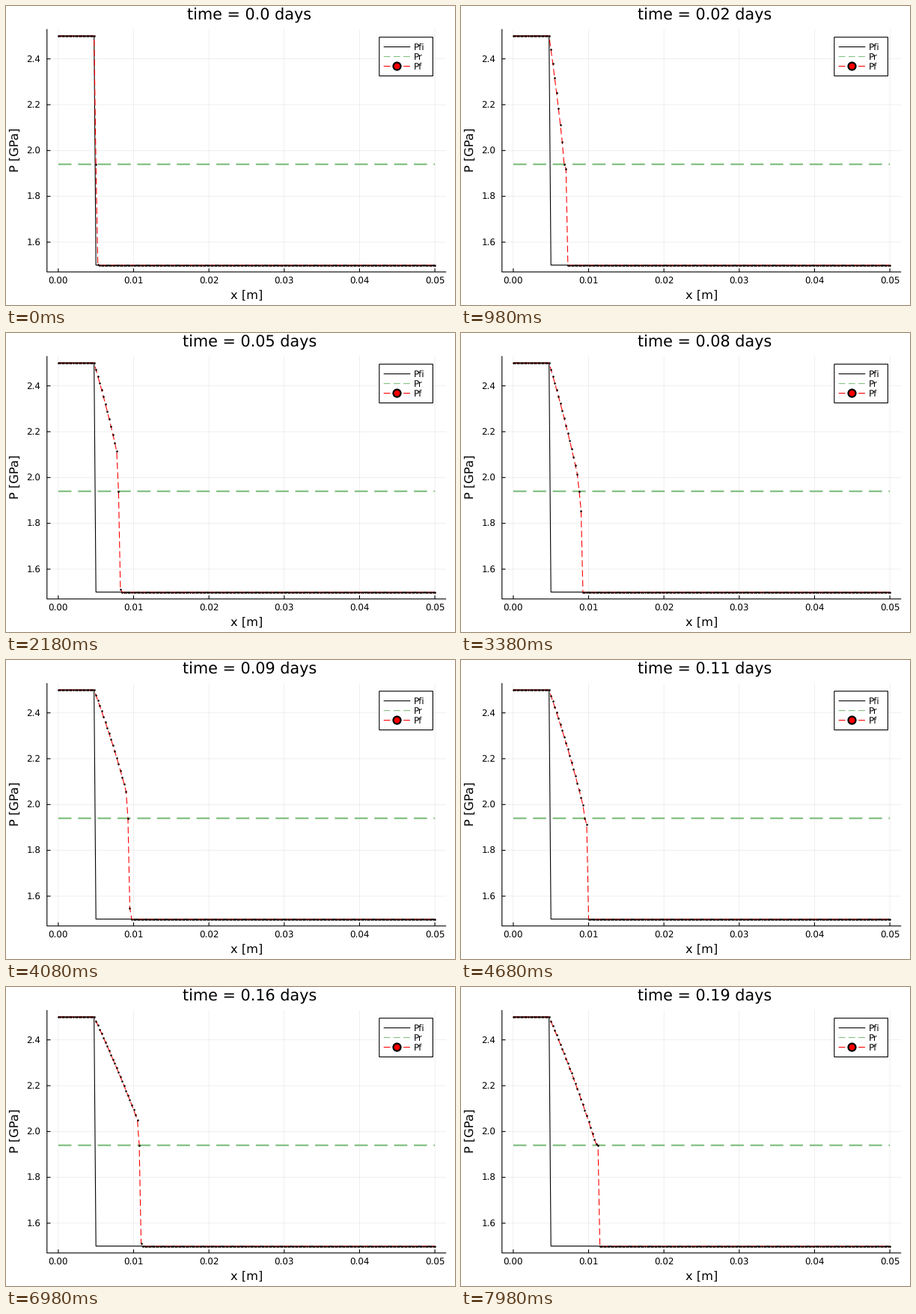
Recreate the animation shown at these times as a matplotlib script. Size 600 by 400 pixels, loop 8000 ms.

```python
import numpy as np
import matplotlib.pyplot as plt
from matplotlib.animation import FuncAnimation
from matplotlib.patches import Circle, Rectangle

plt.rcParams["font.family"] = "DejaVu Sans"
plt.rcParams["text.hinting"] = "none"

WIDTH, HEIGHT, DPI = 600, 400, 100
FRAME_MS, LOOP_MS = 20, 8000
PT = 72 / DPI  # points per pixel

LEFT, RIGHT, TOP, BOTTOM = 54.76, 588.19, 30.87, 355.8
P_HIGH, P_LOW, P_REACT = 2.5, 1.5, 1.94
SOURCE_CELL, LAST_CELL = 19, 44   # high-pressure edge, last cell to react
LATENT = 13                       # storage of the reaction, in GPa
PERM_SLOPE = 0.6                  # growth of permeability with pressure
LAST_STEP = 80
STEP_DAYS = 200 / 86400

x_cells = np.linspace(0, 0.05, 201)
initial = np.where(np.arange(201) <= SOURCE_CELL, P_HIGH, P_LOW)


def px(x):
    return LEFT + (RIGHT - LEFT) * (0.03 + np.asarray(x) / 0.05) / 1.06


def py(p):
    return BOTTOM - (BOTTOM - TOP) * (0.03 + np.asarray(p) - P_LOW) / 1.06


def simulate(dt=0.3, limit=60000):
    """Pressure diffusion behind a reaction front that opens pores cell by cell."""
    stored = initial[SOURCE_CELL:LAST_CELL + 4].copy()
    stored[0] += LATENT
    last = LAST_CELL - SOURCE_CELL
    history = []
    for _ in range(limit):
        excess = stored - P_REACT
        reacted = np.minimum(np.maximum(excess / LATENT, 0), 1)
        p = stored - reacted * LATENT
        history.append(p)
        if reacted[last] >= 1:
            break
        pores = (reacted[1:] + reacted[:-1]) / 2
        mid = np.maximum((p[1:] + p[:-1]) / 2 - P_REACT, 0)
        flux = pores ** 3 * (1 + PERM_SLOPE * mid) * (p[:-1] - p[1:])
        stored[1:-1] += dt * (flux[:-1] - flux[1:])
    return np.array(history)


history = simulate()


def pressure(step):
    share = (step + 1 if step else 0.3) / (LAST_STEP + 1)
    result = initial.copy()
    result[SOURCE_CELL:LAST_CELL + 4] = history[int(share * (len(history) - 1))]
    return result


fig = plt.figure(figsize=(WIDTH / DPI, HEIGHT / DPI), dpi=DPI, facecolor="white")
ax = fig.add_axes([0, 0, 1, 1])
ax.set_xlim(0, WIDTH)
ax.set_ylim(HEIGHT, 0)
ax.axis("off")


def line(xs, ys, color="black", width=1.1, dashed=False, **style):
    if dashed:
        # Dash lengths scale with the line width.
        style["linestyle"] = (0, (8, 4))
        style["dash_capstyle"] = "butt"
    artist, = ax.plot(xs, ys, color=color, lw=width * PT, snap=False,
                      solid_capstyle="butt", **style)
    return artist


def label(x, y, text, size, ha="center", **style):
    return ax.text(x, y, text, fontsize=size * PT, ha=ha, va="baseline", **style)


TICK_SIZE, GUIDE_SIZE, TITLE_SIZE = 11.9, 16.3, 20.8
TICK_LENGTH = 4.72

for value in np.arange(6) / 100:
    x = float(px(value))
    line([x, x], [TOP, BOTTOM], width=0.6, alpha=0.1)
    line([x, x], [BOTTOM, BOTTOM - TICK_LENGTH])
    label(x, 371.4, f"{value:.2f}", TICK_SIZE)
for value in (1.6, 1.8, 2.0, 2.2, 2.4):
    y = float(py(value))
    line([LEFT, RIGHT], [y, y], width=0.6, alpha=0.1)
    line([LEFT, LEFT + TICK_LENGTH], [y, y])
    label(46.3, y + 4.4, f"{value:.1f}", TICK_SIZE, ha="right")
line([LEFT, LEFT, RIGHT], [TOP, BOTTOM, BOTTOM])

title = label(325.3, 18.6, "", TITLE_SIZE)
label(322, 391.6, "x [m]", GUIDE_SIZE)
label(16.6, 192.8, "P [GPa]", GUIDE_SIZE, rotation=90, rotation_mode="anchor")

GREEN = (0.5, 0.75, 0.5)
line(px(x_cells), py(initial))
line(px([0, 0.05]), py([P_REACT, P_REACT]), GREEN, 2.2, dashed=True)
fluid = line(px(x_cells), py(initial), "red", dashed=True, marker="o",
             markersize=1.6 * PT, markerfacecolor="red",
             markeredgecolor="black", markeredgewidth=PT)

LEGEND_TOP, ROW = 41.7, 12.96
ax.add_patch(Rectangle((498.8, LEGEND_TOP), 71.6, 4 * ROW, fc="white",
                       ec="black", lw=1.1 * PT, zorder=3, snap=False))
legend_rows = (("Pfi", "black", False), ("Pr", GREEN, True), ("Pf", "red", True))
for row, (name, color, dashed) in enumerate(legend_rows, start=1):
    y = LEGEND_TOP + ROW * row
    line([504.7, 540.3], [y, y], color, dashed=dashed, zorder=4)
    label(544.4, y + 4.3, name, TICK_SIZE, ha="left", zorder=4)
ax.add_patch(Circle((522.5, LEGEND_TOP + 3 * ROW), 5, fc="red", ec="black",
                    lw=2.2 * PT, zorder=5))


def update(frame):
    step = (frame * FRAME_MS + 20) // 100
    fluid.set_ydata(py(pressure(step)))
    title.set_text(f"time = {round(step * STEP_DAYS, 2)} days")
    return fluid, title


animation = FuncAnimation(fig, update, frames=LOOP_MS // FRAME_MS,
                          interval=FRAME_MS, repeat=True, repeat_delay=0)
plt.show()
```
